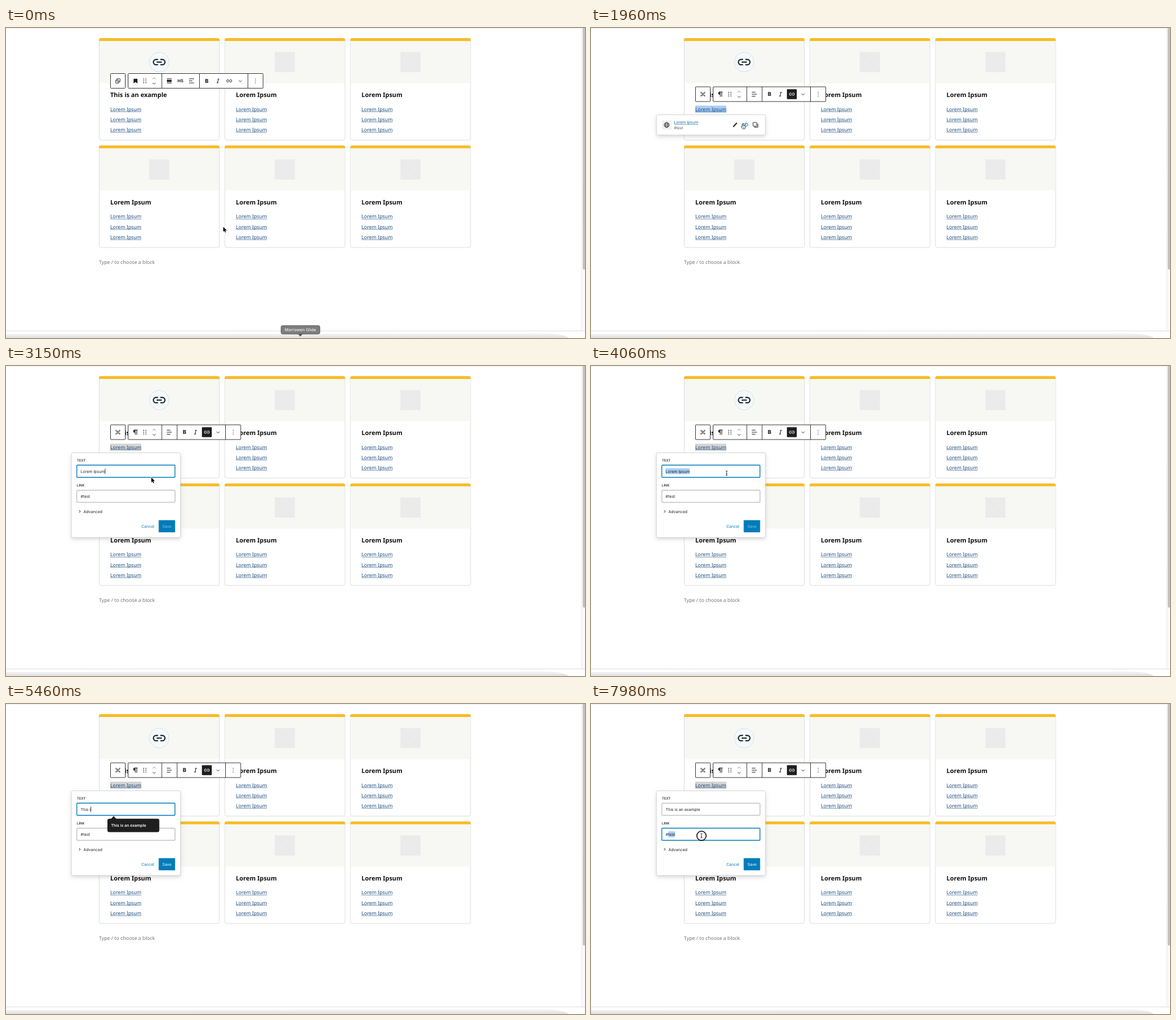
These frames come from a looping animation (1022 px wide and 548 px high, 8000 ms). An HTML page with a canvas:

```html
<!DOCTYPE html>
<html lang="en">
<head>
<meta charset="utf-8">
<title>Editing a link in a block editor</title>
<style>
  html, body { margin: 0; width: 100%; height: 100%; overflow: hidden; background: #fff; }
  canvas { display: block; width: 1022px; height: 548px; }
</style>
</head>
<body>
<canvas id="stage"></canvas>
<script>
const W = 1022, H = 548, LOOP = 8000, TICK = 70;
const INK = '#1e1e1e', BLUE = '#007cba', LINK = '#17487a', PICK = '#a9cdf6';
const NOTO = '"Noto Sans", "Open Sans", sans-serif', UI = 'Inter, Roboto, sans-serif';
const BODY = '8.75px ' + NOTO, HEAD = 'bold 10.95px ' + NOTO, FIELD = '6.95px ' + UI;

const canvas = document.getElementById('stage');
const c = canvas.getContext('2d');
const dpr = window.devicePixelRatio || 1;
canvas.width = W * dpr;
canvas.height = H * dpr;
c.textRendering = 'geometricPrecision';

const within = (t, a, b) => t >= a && t < b;

function box(x, y, w, h, r, fill, stroke, lw = 1) {
  c.beginPath();
  c.roundRect(x, y, w, h, r);
  if (fill) { c.fillStyle = fill; c.fill(); }
  if (stroke) { c.strokeStyle = stroke; c.lineWidth = lw; c.stroke(); }
}

function disc(x, y, r, fill, stroke, lw = 1) {
  box(x - r, y - r, 2 * r, 2 * r, r, fill, stroke, lw);
}

function line(color, lw, ...pts) {
  c.beginPath();
  for (let i = 0; i < pts.length; i += 2) c.lineTo(pts[i], pts[i + 1]);
  c.strokeStyle = color;
  c.lineWidth = lw;
  c.stroke();
}

function poly(fill, ...pts) {
  c.beginPath();
  for (let i = 0; i < pts.length; i += 2) c.lineTo(pts[i], pts[i + 1]);
  c.closePath();
  c.fillStyle = fill;
  c.fill();
}

function text(s, x, y, font, color, align = 'left') {
  c.font = font;
  c.fillStyle = color;
  c.textAlign = align;
  c.fillText(s, x, y);
}

function widthOf(s, font) {
  c.font = font;
  return c.measureText(s).width;
}

function linkText(s, x, y, font, color, drop) {
  text(s, x, y, font, color);
  line(color, 0.6, x, y + drop, x + widthOf(s, font), y + drop);
}

// ---- icons, each drawn around its centre ----
function chain(x, y, w, h, lw, color) {
  const r = h / 2 - lw / 2, gap = w * 0.09, mid = w / 2 - h / 2;
  c.strokeStyle = color;
  c.lineWidth = lw;
  for (const s of [-1, 1]) {
    c.beginPath();
    c.moveTo(x + s * gap, y - r);
    c.lineTo(x + s * mid, y - r);
    c.arc(x + s * mid, y, r, -Math.PI / 2, Math.PI / 2, s < 0);
    c.lineTo(x + s * gap, y + r);
    c.stroke();
  }
  line(color, lw, x - w * 0.2, y, x + w * 0.2, y);
}

function chevron(x, y, w, dir, color = INK) {
  line(color, 0.9, x - w, y - dir * w * 0.45, x, y + dir * w * 0.45, x + w, y - dir * w * 0.45);
}

function grip(x, y) {
  for (const dx of [-1.9, 1.9])
    for (const dy of [-3.2, 0, 3.2]) box(x + dx - 0.7, y + dy - 0.7, 1.4, 1.4, 0.2, INK);
}

function movers(x, y) {
  chevron(x, y - 4.2, 2.7, -1, '#777');
  chevron(x, y + 4.6, 2.7, 1);
}

function alignLeft(x, y) {
  line(INK, 1, x - 4.5, y - 3.6, x + 2, y - 3.6);
  line(INK, 1, x - 4.5, y, x + 4.5, y);
  line(INK, 1, x - 4.5, y + 3.6, x + 2, y + 3.6);
}

function boldItalic(bx, ix, y) {
  text('B', bx, y + 3.4, '800 9.4px ' + UI, INK, 'center');
  line(INK, 0.9, ix - 0.9, y - 3.4, ix + 2.4, y - 3.4);
  line(INK, 0.9, ix - 2.4, y + 3.4, ix + 0.9, y + 3.4);
  line(INK, 1.1, ix + 0.9, y - 3.4, ix - 0.9, y + 3.4);
}

function more(x, y) {
  for (const dy of [-3.4, 0, 3.4]) box(x - 0.6, y + dy - 0.6, 1.2, 1.2, 0.2, INK);
}

function globe(x, y) {
  disc(x, y, 4.4, null, INK, 0.9);
  c.beginPath();
  c.ellipse(x, y, 2, 4.4, 0, 0, 7);
  c.stroke();
  line(INK, 0.8, x - 4.2, y - 1.4, x + 4.2, y - 1.4);
  line(INK, 0.8, x - 4.2, y + 1.6, x + 4.2, y + 1.6);
}

// ---- page ----
function card(x, y, title, first) {
  box(x + 0.5, y + 0.5, 212, 180, 3.5, '#fff', '#dcdcdc');
  c.save();
  box(x, y, 213, 181, 3.5);
  c.clip();
  c.fillStyle = '#f8bc24';
  c.fillRect(x, y, 213, 5.3);
  c.restore();
  c.fillStyle = '#f7f8f4';
  c.fillRect(x + 1, y + 5.3, 211, 74.5);
  const mx = x + 106.4, my = y + 42.6;
  if (first) {
    disc(mx, my, 17.2, '#f3f9fd', '#cfdfeb', 0.9);
    chain(mx, my, 22.6, 11.6, 2.2, '#20252b');
  } else {
    c.fillStyle = '#ebebeb';
    c.fillRect(mx - 17.8, my - 17.8, 35.6, 35.6);
    line('#e0e0e0', 0.5, mx - 17.5, my - 17.5, mx + 17.5, my + 17.5);
  }
  text(title, x + 20, y + 104.7, HEAD, '#111');
}

function cardLinks(x, y) {
  for (let i = 0; i < 3; i++)
    linkText('Lorem Ipsum', x + 20, y + 128.8 + i * 18.2, BODY, LINK, 1.5);
}

function page(t) {
  c.fillStyle = '#fff';
  c.fillRect(0, 0, W, H);
  line('#dcdcdc', 1, 0, 0, W, 0);
  for (let i = 0; i < 6; i++) {
    const x = 164 + (i % 3) * 221.75, y = i < 3 ? 17.7 : 207.5;
    card(x, y, i ? 'Lorem Ipsum' : 'This is an example', !i);
    if (!i && t >= 1120) {
      const skip = t < 1190 ? widthOf('Lorem ', BODY) : 0;
      c.fillStyle = t < 2520 ? PICK : '#d4d4d4';
      c.fillRect(184 + skip, 137.3, widthOf('Lorem Ipsum', BODY) - skip, 12.2);
    }
    cardLinks(x, y);
  }
  if (within(t, 490, 1050)) line('#111', 0.8, 284.6, 112, 284.6, 125.5);
  text('Type / to choose a block', 164, 417.2, BODY, '#757575');

  c.fillStyle = '#fafafa';
  c.fillRect(1016, 0, 6, 535);
  line('#e4e4e4', 0.8, 1016.4, 0, 1016.4, 535);
  box(1018, -6, 6, 433, 2, '#c2c2c2');

  line('#dedede', 1, 0, 535.5, W, 535.5);
  const shade = c.createLinearGradient(0, 540, 0, H);
  shade.addColorStop(0, '#f6f6f6');
  shade.addColorStop(1, '#dfdfdf');
  c.beginPath();
  c.moveTo(0, 541);
  c.lineTo(950, 540);
  c.quadraticCurveTo(982, 540, 994, H);
  c.lineTo(0, H);
  c.fillStyle = shade;
  c.fill();
}

function dockLabel() {
  box(485.5, 526, 68.5, 15, 3, '#7d7d7d', '#595959', 0.9);
  poly('#555', 515.5, 541, 523.5, 541, 519.5, 545.5);
  text('Marrowen Glide', 519.7, 536.2, '7.4px ' + UI, '#fff', 'center');
}

// ---- toolbars ----
function bars(y, right, dividers) {
  box(184.5, y - 13, 26, 26, 1, '#fff', INK, 0.9);
  box(215.5, y - 13, right - 215.5, 26, 1, '#fff', INK, 0.9);
  for (const x of dividers) line(INK, 0.9, x, y - 13, x, y + 13);
  grip(245, y);
  movers(261.5, y);
}

function headingBar() {
  const y = 93.5;
  bars(y, 453.8, [275, 341.5, 427]);
  box(195.8, y - 4, 5.6, 5.6, 0.6, null, INK, 0.9);
  box(193.6, y - 1.6, 5.6, 5.6, 0.6, null, INK, 0.9);
  poly(INK, 225.2, y - 3.8, 232, y - 3.8, 232, y + 4.4, 228.6, y + 2, 225.2, y + 4.4);
  line(INK, 1, 284, y - 3.8, 292.4, y - 3.8);
  box(284, y - 1.9, 8.4, 3.8, 0, INK);
  line(INK, 1, 284, y + 3.8, 292.4, y + 3.8);
  text('H5', 308, y + 2.8, '700 7.5px ' + UI, INK, 'center');
  line(INK, 1, 323, y - 3.6, 332, y - 3.6);
  line(INK, 1, 323, y, 329, y);
  line(INK, 1, 323, y + 3.6, 332, y + 3.6);
  boldItalic(354.3, 374.2, y);
  chain(394, y, 10, 5.2, 1, INK);
  chevron(413.5, y + 0.3, 2.7, 1);
  more(440.3, y);
}

function textBar() {
  const y = 117;
  bars(y, 414.3, [275, 302, 387.5]);
  for (const s of [-1, 1])
    line(INK, 1, 194.2, y + s * 4.3, 194.2, y + s * 1.7, 200.8, y + s * 1.7, 200.8, y + s * 4.3);
  line(INK, 1, 197.5, y - 1.7, 197.5, y + 1.7);
  c.beginPath();
  c.arc(227.4, y - 1.7, 2.7, Math.PI / 2, Math.PI * 1.5);
  c.fillStyle = INK;
  c.fill();
  line(INK, 1, 227, y - 3.9, 232.4, y - 3.9);
  line(INK, 1.1, 228.2, y - 4.2, 228.2, y + 4.4);
  line(INK, 1.1, 230.8, y - 4.2, 230.8, y + 4.4);
  alignLeft(288.3, y);
  boldItalic(315, 334.5, y);
  box(345.8, y - 8.7, 17.4, 17.4, 1, INK);
  chain(354.5, y, 10, 5.2, 1, '#fff');
  chevron(374.2, y + 0.3, 2.7, 1);
  more(401, y);
}

// ---- link popover ----
function panel(h) {
  c.save();
  c.shadowColor = 'rgba(0,0,0,.16)';
  c.shadowBlur = 7 * dpr;
  c.shadowOffsetY = 3 * dpr;
  box(115.5, 153.5, 192.3, h, 2, '#fff');
  c.restore();
  box(115.5, 153.5, 192.3, h, 2, null, '#cfcfcf', 0.8);
}

function preview(t) {
  panel(35.5);
  box(125, 163, 17, 17, 1, '#f0f0f0');
  globe(133.6, 171.4);
  linkText('Lorem Ipsum', 146.6, 169.2, FIELD, '#0e6a9c', 1.3);
  text('#test', 146.6, 178.7, '6.6px ' + UI, '#555');
  line(INK, 2, 252.4, 173.2, 257.6, 167.6);
  poly(INK, 250.6, 175.4, 251.4, 172.2, 253.6, 174.3);
  const tint = within(t, 1820, 2170) ? BLUE : INK;
  chain(272, 171, 11, 5.6, 1, tint);
  line(tint, 1, 273.6, 166.8, 270.6, 175.4);
  box(286, 167, 6.6, 6.6, 0.8, null, INK, 1);
  line(INK, 1, 294.6, 169, 294.6, 175.4, 288, 175.4);
}

const PHRASE = 'This is an example';
const KEYS = [4690, 4900, 5110, 5180, 5320, 5460, 5530, 5670, 5810,
  6090, 6230, 6440, 6510, 6650, 6650, 6720, 6720, 6790];

function input(y, value, focus, from, caret) {
  box(125, y, 173.3, 21.5, 1, '#fff', focus ? BLUE : '#949494', focus ? 1.4 : 0.8);
  const x = 131.8, w = widthOf(value, FIELD);
  if (from >= 0) {
    const skip = widthOf(value.slice(0, from), FIELD);
    c.fillStyle = PICK;
    c.fillRect(x + skip, y + 5.6, w - skip, 10.2);
  }
  text(value, x, y + 13.4, FIELD, INK);
  if (caret) line('#000', 0.8, x + w + 0.5, y + 6, x + w + 0.5, y + 15.6);
}

function suggestions(t) {
  const all = t < 4970;
  const items = all
    ? ['test', PHRASE, 'Takeover Menu (Main)', 'test layout', 'Territorial Acknowledgement']
    : [PHRASE];
  poly(INK, 185, 203.5, 190, 198, 195, 203.5);
  box(179, 202.8, all ? 127.4 : 91.6, all ? 102.2 : 23.6, 3.5, INK);
  items.forEach((s, i) => text(s, 185.4, 217.1 + i * 19.7, '600 6.95px ' + UI, '#fff'));
}

function form(t) {
  panel(149.6);
  const typed = KEYS.filter(k => k <= t).length;
  const value = typed ? PHRASE.slice(0, typed) : 'Lorem Ipsum';
  const onLink = t >= 7770;
  const from = within(t, 3640, 3920) ? 6 : within(t, 3920, 4690) ? 0 : -1;
  const caret = within(t, 2520, 2800) || within(t, 3010, 3640) ||
    within(t, 4690, 5950) || within(t, 6090, 7280);
  text('TEXT', 125, 169.2, '500 6px ' + UI, INK);
  input(175.3, value, !onLink, from, caret);
  text('LINK', 125, 212.9, '500 6px ' + UI, INK);
  input(219.5, '#test', onLink, t >= 7910 ? 1 : -1, within(t, 7770, 7910));
  line(INK, 1, 129, 255, 131.2, 257.2, 129, 259.4);
  text('Advanced', 136.8, 259.8, FIELD, INK);
  text('Cancel', 250.4, 286, FIELD, BLUE, 'center');
  box(269.5, 272.5, 29, 21.6, 1, BLUE);
  text('Save', 284, 286, FIELD, typed ? '#fff' : '#8cc5e2', 'center');
  if (within(t, 4760, 6790)) suggestions(t);
}

// ---- pointer ----
const PATH = [
  [0, 383.5, 351.5], [700, 230.5, 142.5], [1470, 230.5, 142.5], [1680, 267.8, 169],
  [2100, 267.8, 169], [2310, 254, 171], [2520, 254, 171], [2870, 259.5, 196],
  [2940, 259.5, 196], [3150, 256.5, 197], [3430, 239.5, 189.5],
  [7420, 239.5, 189.5], [7770, 195, 233], [LOOP, 195, 233]
];
const CLICKS = [[980, 1050], [1120, 1260], [2380, 2520], [3430, 3500], [3640, 3850],
  [3920, 4060], [7770, 7840], [7910, LOOP]];

function pointerAt(t) {
  const i = PATH.findIndex(p => p[0] > t);
  const [t0, x0, y0] = PATH[i - 1], [t1, x1, y1] = PATH[i];
  const u = (t - t0) / (t1 - t0), e = u * u * (3 - 2 * u);
  return [x0 + (x1 - x0) * e, y0 + (y1 - y0) * e];
}

function arrow() {
  c.beginPath();
  [[0, 0], [0, 8.7], [1.9, 7], [3.3, 10.1], [4.8, 9.4], [3.4, 6.4], [6.1, 6.2]]
    .forEach(p => c.lineTo(...p));
  c.closePath();
  c.strokeStyle = '#fff';
  c.lineWidth = 1.2;
  c.stroke();
  c.fillStyle = '#000';
  c.fill();
}

function beam() {
  for (const [color, lw] of [['#fff', 1.6], ['#111', 0.8]]) {
    line(color, lw, -1.8, -4.2, 0, -3.4, 1.8, -4.2);
    line(color, lw, -1.8, 4.2, 0, 3.4, 1.8, 4.2);
    line(color, lw, 0, -3.6, 0, 3.6);
    line(color, lw, -1, 1, 1, 1);
  }
}

function hand() {
  c.beginPath();
  c.moveTo(-0.9, 5);
  c.lineTo(-0.9, 0.6);
  c.quadraticCurveTo(0, -0.6, 0.9, 0.6);
  c.lineTo(0.9, 3.4);
  c.quadraticCurveTo(4.8, 3, 4.9, 5);
  c.quadraticCurveTo(5, 7.5, 3.7, 9.2);
  c.lineTo(-0.2, 9.2);
  c.quadraticCurveTo(-1.2, 7.4, -2.8, 5.8);
  c.quadraticCurveTo(-2.6, 4.4, -0.9, 5.6);
  c.closePath();
  c.fillStyle = '#fff';
  c.fill();
  c.strokeStyle = '#111';
  c.lineWidth = 0.8;
  c.stroke();
  for (const x of [1.1, 2.5]) line('#111', 0.5, x, 5.5, x, 7.6);
}

function pointer(t) {
  if (within(t, 4690, 7490)) return;
  const [x, y] = pointerAt(t);
  const overField = t >= 2590 && x > 125 && x < 298 &&
    (within(y, 175, 196) || within(y, 220, 241));
  c.save();
  c.translate(x, y);
  if (CLICKS.some(([a, b]) => within(t, a, b))) disc(0, 0, 8.2, 'rgba(255,255,255,.25)', '#000', 1.5);
  if (within(t, 840, 1540) || overField) beam();
  else if (within(t, 1820, 2590)) hand();
  else arrow();
  c.restore();
}

function draw(t) {
  c.setTransform(dpr, 0, 0, dpr, 0, 0);
  page(t);
  if (t < 1050) headingBar();
  else textBar();
  if (within(t, 1190, 2520)) preview(t);
  if (t >= 2520) form(t);
  if (t < 210) dockLabel();
  pointer(t);
}

const start = performance.now();
function frame() {
  const t = (performance.now() - start) % LOOP;
  draw(Math.floor(t / TICK) * TICK);
  requestAnimationFrame(frame);
}
frame();
</script>
</body>
</html>
```
